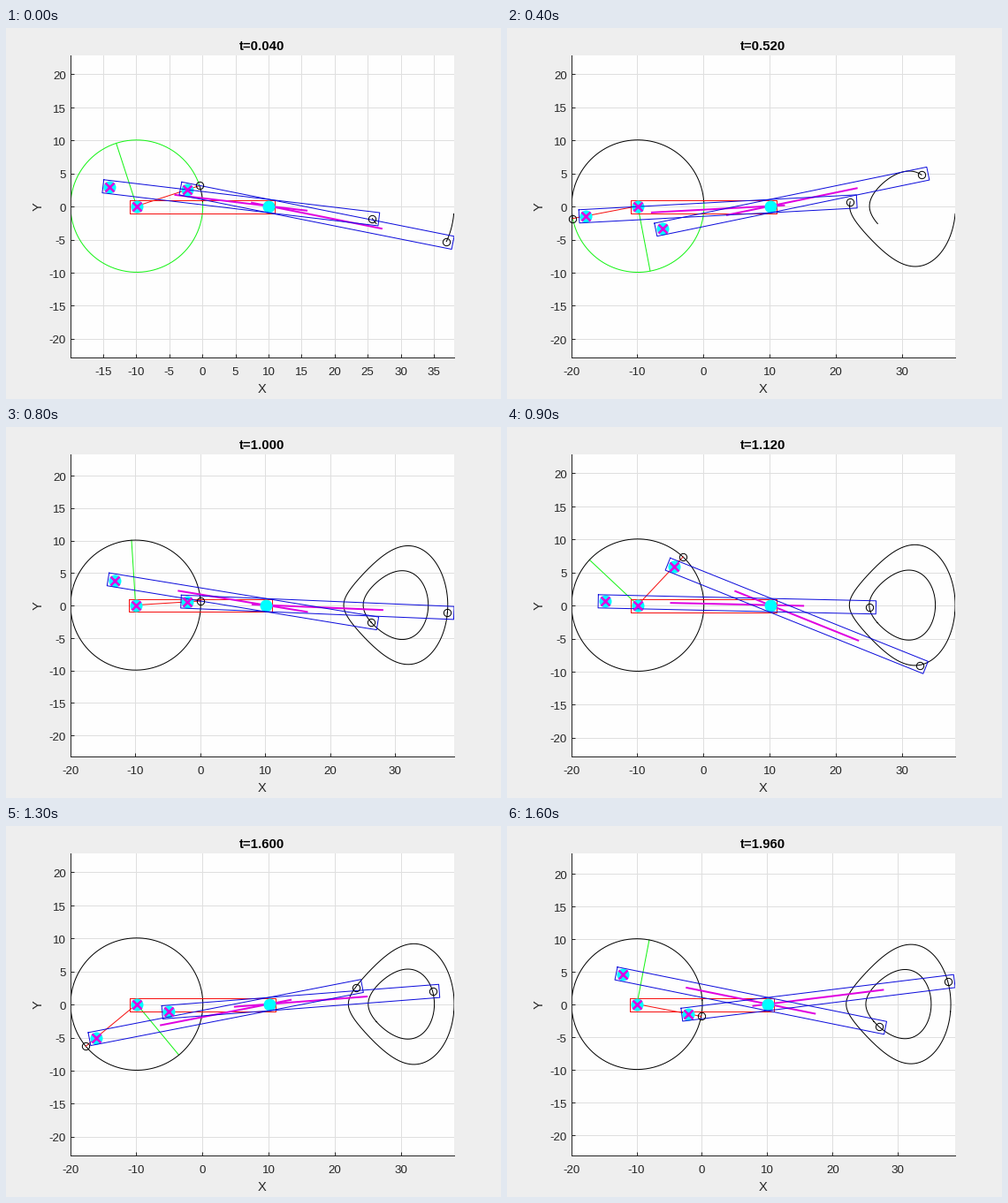
Recreate the animation shown at these times as a matplotlib script. Size 560 by 420 pixels, loop 1700 ms.

```python
import numpy as np
import matplotlib.pyplot as plt
from matplotlib.animation import FuncAnimation
from matplotlib.transforms import Affine2D

W, H, DPI = 560, 420, 100
PX = 72 / DPI                        # points per pixel
BOX = (72.55, 46.73, 434, 342.3)     # axes box: left, bottom, width, height
INK = "#262626"
RED, GREEN, BLUE = "#f61010", "#14f414", "#0c0cdc"
MAGENTA = "#e000e0"
CRANK = np.array([-10.0, 0.0])
PIVOT = np.array([10.0, 0.0])
ROD = 40
FRAMES, INTERVAL = 17, 100

plt.rcParams["font.family"] = "Liberation Sans"
fig = plt.figure(figsize=(W / DPI, H / DPI), dpi=DPI, facecolor="#eeeeee")
ax = fig.add_axes([BOX[0] / W, BOX[1] / H, BOX[2] / W, BOX[3] / H])

# Snapped lines land on pixel centres; free shapes need the same half pixel.
HALF_PIXEL = Affine2D().translate(0.5, 0.5)


def polar(radius, angle):
    return CRANK + radius * np.stack([np.cos(angle), np.sin(angle)], -1)


def crank_angle(t):
    return 2 * np.pi * (t + 0.01)


def pins(t):
    """Crank pins that drive the two slotted rods."""
    a = crank_angle(t)
    return polar(8, a), polar(5, a + np.arctan2(4, -3))


def direction(pin):
    d = PIVOT - pin
    return d / np.linalg.norm(d, axis=-1, keepdims=True)


def bar(start, d, length):
    """Closed outline of a bar of half-width 1 reaching 1 past both ends."""
    n = np.array([-d[1], d[0]])
    a, b = start - d, start + (length + 1) * d
    return np.array([a + n, b + n, b - n, a - n, a + n])


def line(points, color, width=1.0, z=3, snap=False):
    x, y = np.asarray(points).T
    place = ax.transData if snap else ax.transData + HALF_PIXEL
    ax.plot(x, y, color=color, lw=width * PX, zorder=z, snap=snap,
            transform=place)


def mark(p, shape, size, z, **style):
    ax.plot(*p, shape, ms=size * PX, zorder=z, clip_on=False, snap=False,
            transform=ax.transData + HALF_PIXEL, **style)


def ring(p):
    mark(p, "o", 8.3, 6, mfc="none", mec="black", mew=PX)


def draw_axes(lo, hi):
    half = (hi - lo) * BOX[3] / BOX[2] / 2
    ax.set_xlim(lo, hi)
    ax.set_ylim(-half, half)
    ax.set_facecolor("#fefefe")
    ax.set_axisbelow(True)

    for step in (5, 10):
        xticks = np.arange(np.ceil(lo / step), np.floor(hi / step) + 1) * step
        if len(xticks) <= 11:
            break
    yticks = np.arange(-20, 21, 5)
    ax.set_xticks(xticks)
    ax.set_yticks(yticks)
    ax.grid(color="#dfdfdf", lw=PX)
    ax.tick_params(direction="in", length=4.3 * PX, width=PX, color=INK,
                   labelbottom=False, labelleft=False)
    for side in ("top", "right"):
        ax.spines[side].set_visible(False)
    for side in ("left", "bottom"):
        ax.spines[side].set(linewidth=PX, color=INK)

    font = dict(fontsize=13.33 * PX, color=INK, va="baseline")
    for x in xticks:
        ax.text(x, -19.7 / BOX[3], f"{x:.0f}", ha="center",
                transform=ax.get_xaxis_transform(), **font)
    drop = 5.7 * 2 * half / BOX[3]
    for y in yticks:
        ax.text(-4.7 / BOX[2], y - drop, f"{y}", ha="right",
                transform=ax.get_yaxis_transform(), **font)


def draw(i):
    ax.clear()
    t = 0.04 + 0.12 * i
    angle = crank_angle(t)
    past = np.linspace(0, min(t, 1), 400)   # trails close after one turn
    done = crank_angle(past)

    line(polar(10, np.linspace(done[-1], crank_angle(1), 300)), GREEN, z=2)
    line([CRANK, polar(10, angle + np.pi / 2)], GREEN, z=2)
    line(polar(10, done), "black", z=2.5)
    line(bar(CRANK, np.array([1.0, 0.0]), 20), RED, snap=True)
    line([CRANK, polar(10, angle)], RED)
    ring(polar(10, angle))

    hi = 0
    for pin, trail in zip(pins(t), pins(past)):
        d = direction(pin)
        outline = bar(pin, d, ROD)
        path = trail + ROD * direction(trail)
        line(path, "black")
        line(outline, BLUE, z=5.2)
        line([pin + 10 * d, pin + 30 * d], MAGENTA, 2, z=4.5)
        ring(pin + ROD * d)
        hi = max(hi, outline[:, 0].max(), path[:, 0].max())

    for p in (CRANK, PIVOT, *pins(t)):
        mark(p, "o", 14, 5, color="cyan", mew=0)
    for p in (CRANK, *pins(t)):
        mark(p, "x", 10, 5.5, color=MAGENTA, mew=2.6 * PX)

    draw_axes(-20 if angle >= np.pi else -19.99, hi)
    title.set_text(f"t={t:.3f}")


def label(x, y, s, size=14.67, **style):
    return fig.text(x / W, 1 - y / H, s, ha="center",
                    fontsize=size * PX, **style)


title = label(289.8, 25, "", 15, weight="bold", color="black", va="baseline")
label(289.8, 413, "X", color=INK, va="baseline")
label(36.5, 202, "Y", color=INK, va="center", rotation=90)

anim = FuncAnimation(fig, draw, frames=FRAMES, interval=INTERVAL,
                     init_func=lambda: None, repeat=True, repeat_delay=0)
plt.show()
```
